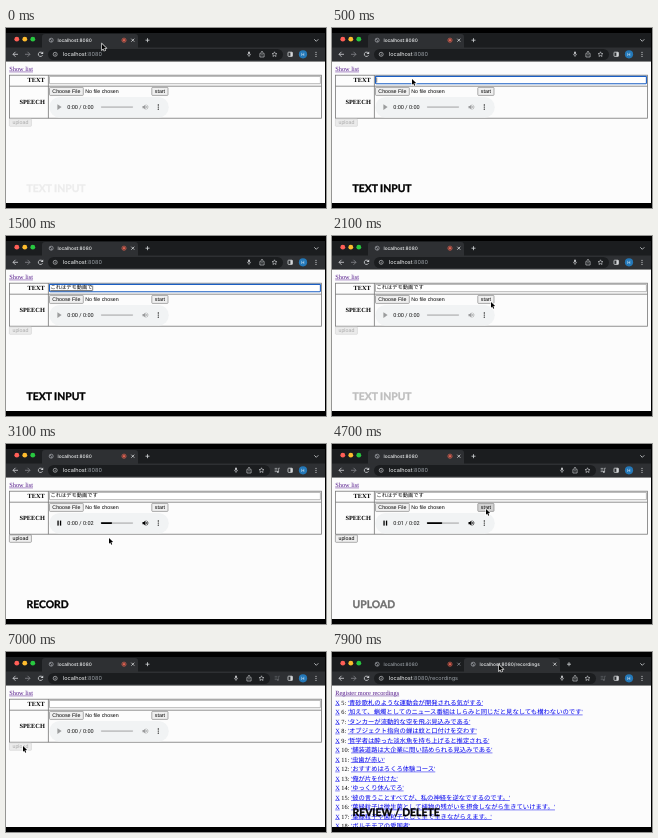
An HTML page with a canvas that plays this animation: 320 px wide and 180 px high, repeating every 8 s.

```html
<!DOCTYPE html>
<html lang="ja">
<head>
<meta charset="utf-8">
<style>
html, body { margin: 0; width: 100%; height: 100%; overflow: hidden; background: #000 }
canvas { display: block; width: 320px; height: 180px }
</style>
</head>
<body>
<canvas id="stage" width="320" height="180"></canvas>
<script>
const c = document.getElementById('stage').getContext('2d');
c.textRendering = 'geometricPrecision';
const LOOP = 8000;
const CJK = '"Noto Sans CJK JP", "Noto Sans CJK", sans-serif';
const UI = 'Inter, sans-serif';
const SERIF = '"Liberation Serif", ' + CJK;
const ARIAL = '"Liberation Sans", ' + CJK;
const PHRASE = 'これはデモ動画です';
const FIRST_PLAY = 2800, SECOND_PLAY = 4290, PLAY_TIME = 860;
const UPLOADED = 5700, OPEN_LIST = 7380;
const BAR = '#2e3033', STRIP = '#1b1d1f', PAGE = '#fcfcfc', BOTTOM = 175;

// text, fade-in start and end, fade-out start and end
const captions = [
  ['TEXT INPUT', -30, 450, 1800, 2200],
  ['RECORD', 2350, 2750, 3950, 4350],
  ['UPLOAD', 4450, 4900, 6350, 6800],
  ['REVIEW / DELETE', 7350, 7800, 9000, 9400]
];

// time, x, y of the pointer tip
const path = [
  [0, 96, 16], [100, 96, 16], [450, 80, 51], [1800, 80, 51], [2080, 159, 66],
  [2800, 159, 66], [3050, 103, 94], [3350, 103, 94], [3720, 154, 65], [4750, 154, 65],
  [5000, 80, 112], [5280, 17, 94], [7020, 17, 94], [7250, 15, 41], [7420, 15, 41],
  [7800, 167, 13], [8000, 167, 13]
];

const recordings = [
  '青砂歌札のような運動会が開発される気がする',
  '加えて、蝋燭としてのニュース番組はしらみと同じだと見なしても構わないのです',
  'タンカーが流動的な空を飛ぶ見込みである',
  'オブジェクト指向の蝉は蚊と口付けを交わす',
  '哲学者は酔った淡水魚を持ち上げると推定される',
  '舗装道路は大企業に問い詰められる見込みである',
  '虫歯が赤い',
  'おすすめはろくろ体験コース',
  '俺が片を付けた',
  'ゆっくり休んでろ',
  '彼の言うことすべてが、私の神経を逆なでするのです。',
  '葉緑粒子は微生菌として植物の残がいを摂食しながら生きていけます。',
  '葉緑粒子や菌粒子として生で生きながらえます。',
  'ボルチモアの愛国者'
];

const clamp = v => Math.max(0, Math.min(1, v));
const ramp = (t, a, b) => clamp((t - a) / (b - a));
const within = (t, a, b) => t >= a && t < b;

function rect(x, y, w, h, fill) {
  c.fillStyle = fill;
  c.fillRect(x, y, w, h);
}

function box(x, y, w, h, r, fill, stroke, lw = 0.6) {
  c.beginPath();
  c.roundRect(x, y, w, h, r);
  if (fill) { c.fillStyle = fill; c.fill(); }
  if (stroke) { c.strokeStyle = stroke; c.lineWidth = lw; c.stroke(); }
}

function dot(x, y, r, fill) {
  c.beginPath();
  c.arc(x, y, r, 0, 7);
  c.fillStyle = fill;
  c.fill();
}

function ring(x, y, r, color, lw = 0.7, a = 0, b = 7) {
  c.beginPath();
  c.arc(x, y, r, a, b);
  c.strokeStyle = color;
  c.lineWidth = lw;
  c.stroke();
}

function line(color, lw, ...p) {
  c.beginPath();
  for (let i = 0; i < p.length; i += 2) c.lineTo(p[i], p[i + 1]);
  c.strokeStyle = color;
  c.lineWidth = lw;
  c.stroke();
}

function poly(fill, ...p) {
  c.beginPath();
  for (let i = 0; i < p.length; i += 2) c.lineTo(p[i], p[i + 1]);
  c.closePath();
  c.fillStyle = fill;
  c.fill();
}

// Draws text and returns its width
function text(s, x, y, size, family, color, align = 'left', weight = 400) {
  c.font = `${weight} ${size}px ${family}`;
  c.textAlign = align;
  c.fillStyle = color;
  c.fillText(s, x, y);
  return c.measureText(s).width;
}

function link(s, x, y, color) {
  const w = text(s, x, y, 6.33, SERIF, color);
  rect(x, y + 0.7, w, 0.5, color);
  return w;
}

function tab(x, title, active, recording) {
  if (active) box(x, 6, 96, 16, [3, 3, 0, 0], BAR);
  const color = active ? '#f1f3f4' : '#9aa0a6';
  ring(x + 9.2, 12.2, 2, '#a9adb2', 0.7);
  line('#a9adb2', 0.6, x + 7.8, 11, x + 9.7, 12.4, x + 9.2, 14);
  text(title, x + 15.5, 13.9, 4.75, UI, color, 'left', 500);
  if (recording) {
    ring(x + 82, 12.2, 2.1, '#e0604f', 0.7);
    dot(x + 82, 12.2, 1.2, '#e0604f');
  }
  line(color, 0.7, x + 89.3, 10.7, x + 92.3, 13.7);
  line(color, 0.7, x + 89.3, 13.7, x + 92.3, 10.7);
}

function mic(x, color) {
  box(x - 0.8, 23.4, 1.6, 3.2, 0.8, color);
  ring(x, 25.8, 1.7, color, 0.5, 0, Math.PI);
  line(color, 0.6, x, 27.5, x, 28.9);
}

function share(x, color) {
  line(color, 0.6, x - 1.2, 25.4, x - 2.1, 25.4, x - 2.1, 29, x + 2.1, 29, x + 2.1, 25.4, x + 1.2, 25.4);
  line(color, 0.6, x, 27.5, x, 23.3);
  line(color, 0.6, x - 1.2, 24.5, x, 23.3, x + 1.2, 24.5);
}

function star(x, color) {
  const p = [];
  for (let i = 0; i <= 10; i++) {
    const r = i % 2 ? 1.2 : 2.6, a = i * Math.PI / 5;
    p.push(x + r * Math.sin(a), 26.4 - r * Math.cos(a));
  }
  line(color, 0.6, ...p);
}

function mediaIcon(x, color) {
  for (const y of [24.4, 26, 27.6]) line(color, 0.6, x - 2.3, y, x + 0.4, y);
  line(color, 0.6, x + 2.8, 24.2, x + 1.6, 24.2, x + 1.6, 27.8);
  dot(x + 0.9, 27.9, 0.9, color);
}

function chrome(t, list) {
  rect(0, 0, 320, 180, '#000');
  rect(0, 5, 319, 17, STRIP);
  ['#ff5f57', '#febc2e', '#28c840'].forEach((col, i) => dot(10.8 + 8 * i, 11.2, 2.4, col));
  tab(36, 'localhost:8080', !list, true);
  if (list) tab(132, 'localhost:8080/recordings', true, false);
  const plus = list ? 237 : 141.5, icon = '#d5d7da';
  line(icon, 0.8, plus - 2, 12.2, plus + 2, 12.2);
  line(icon, 0.8, plus, 10.2, plus, 14.2);
  line(icon, 0.8, 308.3, 11.3, 310.3, 13.3, 312.3, 11.3);

  rect(0, 19.5, 319, 14, BAR);
  line(icon, 0.8, 9.5, 23.8, 7, 26.3, 9.5, 28.8);
  line(icon, 0.8, 7, 26.3, 12, 26.3);
  line('#85878b', 0.8, 21.5, 23.8, 24, 26.3, 21.5, 28.8);
  line('#85878b', 0.8, 19, 26.3, 24, 26.3);
  ring(34.5, 26.3, 2.2, icon, 0.8, 0.4, 5.6);
  poly(icon, 37.2, 23.4, 37.2, 26, 34.6, 26);

  // The media button pushes the address bar icons left
  const media = t >= FIRST_PLAY, shift = media ? 13 : 0;
  box(42, 20.9, 235 - shift, 11.2, 5.6, STRIP);
  ring(49.2, 26.3, 2, icon, 0.6);
  line(icon, 0.6, 49.2, 26, 49.2, 27.4);
  dot(49.2, 25.1, 0.35, icon);
  const w = text('localhost', 56.8, 28.3, 5.55, UI, '#f1f3f4');
  text(':8080' + (list ? '/recordings' : ''), 56.8 + w, 28.3, 5.55, UI, '#9aa0a6');
  mic(243 - shift, icon);
  share(256 - shift, icon);
  star(268.5 - shift, icon);
  if (media) mediaIcon(271, t < UPLOADED ? icon : '#65686c');
  box(282, 24.2, 4.4, 4.2, 0.6, null, icon, 0.8);
  rect(284.4, 24.2, 2, 4.2, icon);
  dot(297, 26.3, 4.1, '#2478b8');
  text('H', 297, 28, 4.4, UI, '#fff', 'center');
  for (const y of [24.3, 26.3, 28.3]) dot(310, y, 0.6, icon);
  rect(0, 33.5, 319, BOTTOM - 33.5, PAGE);
}

function button(s, x, y, w, h, state) {
  const off = state === 'off';
  box(x, y, w, h, 0.8, state === 'hover' ? '#d2d2d2' : off ? '#ebebeb' : '#efefef',
    off ? '#d0d0d0' : '#777', 0.6);
  text(s, x + w / 2, y + h / 2 + 1.85, 5.28, ARIAL, off ? '#aaa' : '#000', 'center');
}

function player(ready, frac) {
  const playing = ready && frac < 1;
  const ink = ready ? '#000' : '#9b9c9d';
  box(43.3, 69, 119.5, 20.6, 10.3, '#f1f3f4');
  if (playing) {
    rect(51.4, 76.6, 1.3, 5, ink);
    rect(53.9, 76.6, 1.3, 5, ink);
  } else {
    poly(ink, 51.4, 76.3, 55.6, 79.1, 51.4, 81.9);
  }
  const sec = ready ? Math.floor(frac * 2.3) : 0;
  text(`0:0${sec} / 0:0${ready ? 2 : 0}`, 61.3, 81, 5.54, 'Roboto, sans-serif', '#111');
  box(94.8, 78.3, 32.4, 1.6, 0.8, '#c3c4c5');
  if (ready) box(94.8, 78.3, 32.4 * frac, 1.6, 0.8, '#000');
  poly(ink, 136.5, 78, 137.8, 78, 139.5, 76.4, 139.5, 81.8, 137.8, 80.2, 136.5, 80.2);
  ring(139.6, 79.1, 1.1, ink, 0.7, -1.2, 1.2);
  ring(139.6, 79.1, 2.4, ink, 0.6, -1.2, 1.2);
  for (const y of [77, 79.1, 81.2]) dot(152.3, y, 0.65, '#111');
}

function form(t) {
  const ready = within(t, FIRST_PLAY, UPLOADED);
  const focused = within(t, 420, 2050);
  const stopping = within(t, 2150, FIRST_PLAY) || within(t, 4010, SECOND_PLAY);
  const onStart = within(t, 2120, 2830) || within(t, 3690, 4790);
  const played = t < SECOND_PLAY ? FIRST_PLAY : SECOND_PLAY;

  link('Show list', 3.2, 43, '#551a8b');
  c.strokeStyle = '#777';
  c.lineWidth = 0.8;
  c.strokeRect(3.4, 47.2, 312, 43);
  line('#777', 0.8, 3.4, 58.2, 315.4, 58.2);
  line('#777', 0.8, 42.4, 47.2, 42.4, 90.2);
  text('TEXT', 38.8, 54, 6.33, SERIF, '#000', 'right', 700);
  text('SPEECH', 38.8, 76, 6.33, SERIF, '#000', 'right', 700);

  box(43.5, 48.4, 270.9, 7.3, focused ? 0.6 : 0, '#fff',
    focused ? '#1b5fc4' : '#999', focused ? 1.1 : 0.7);
  const count = Math.max(0, Math.floor((t - 560) / 130) + 1);
  const typed = t < UPLOADED ? PHRASE.slice(0, count) : '';
  const w = text(typed, 44.4, 53.4, 5.25, CJK, '#000', 'left', 500);
  if (typed && t < 1750) rect(44.4, 54.5, w, 0.6, '#000');
  if (focused && t % 1000 < 950) rect(44.6 + w, 49.5, 0.5, 5, '#000');

  button('Choose File', 43.5, 59.4, 33.8, 8);
  text('No file chosen', 79.3, 65.2, 5.28, ARIAL, '#000');
  button(stopping ? 'stop' : 'start', 145.8, 59.4, 16.2, 8, onStart ? 'hover' : '');
  player(ready, ramp(t, played, played + PLAY_TIME));
  button('upload', 3.4, 90.9, 22, 7.4, !ready ? 'off' : t > 5250 ? 'hover' : '');
}

function list() {
  link('Register more recordings', 3.2, 43, '#551a8b');
  recordings.forEach((s, i) => {
    const y = 52.5 + 9.5 * i;
    let x = 3.2;
    x += link('X', x, y, '#0000ee');
    x += text(` ${i + 5}: `, x, y, 6.33, SERIF, '#000');
    link(`'${s}'`, x, y, '#0000ee');
  });
  rect(0, BOTTOM, 320, 180 - BOTTOM, '#000');
}

function caption(s, alpha) {
  if (!alpha) return;
  const shade = Math.round(252 * (1 - alpha));
  const color = `rgb(${shade}, ${shade}, ${shade})`;
  text(s, 20.5, 163.7, 10.4, 'Lato, sans-serif', color, 'left', 700);
  c.strokeStyle = color;
  c.lineWidth = 0.35;
  c.strokeText(s, 20.5, 163.7);
}

function pointer(t) {
  if (within(t, 560, 1820)) return;
  const i = Math.max(1, path.findIndex(p => p[0] > t));
  const [t0, x0, y0] = path[i - 1], [t1, x1, y1] = path[i];
  let k = ramp(t, t0, t1);
  k *= k * (3 - 2 * k);
  c.save();
  c.translate(x0 + (x1 - x0) * k, y0 + (y1 - y0) * k);
  c.beginPath();
  [[0, 0], [0, 5.8], [1.3, 4.6], [2.2, 6.7], [3.2, 6.2], [2.3, 4.2], [4.1, 4.1]]
    .forEach(p => c.lineTo(...p));
  c.closePath();
  c.strokeStyle = '#fff';
  c.lineWidth = 1.2;
  c.stroke();
  c.fillStyle = '#000';
  c.fill();
  c.restore();
}

function draw(now) {
  const t = now % LOOP, showList = t >= OPEN_LIST;
  chrome(t, showList);
  if (showList) list();
  else form(t);
  for (const [s, a, b, d, e] of captions) caption(s, ramp(t, a, b) * (1 - ramp(t, d, e)));
  pointer(t);
}

const start = performance.now();
function tick() {
  draw(performance.now() - start);
  requestAnimationFrame(tick);
}
tick();
</script>
</body>
</html>
```
